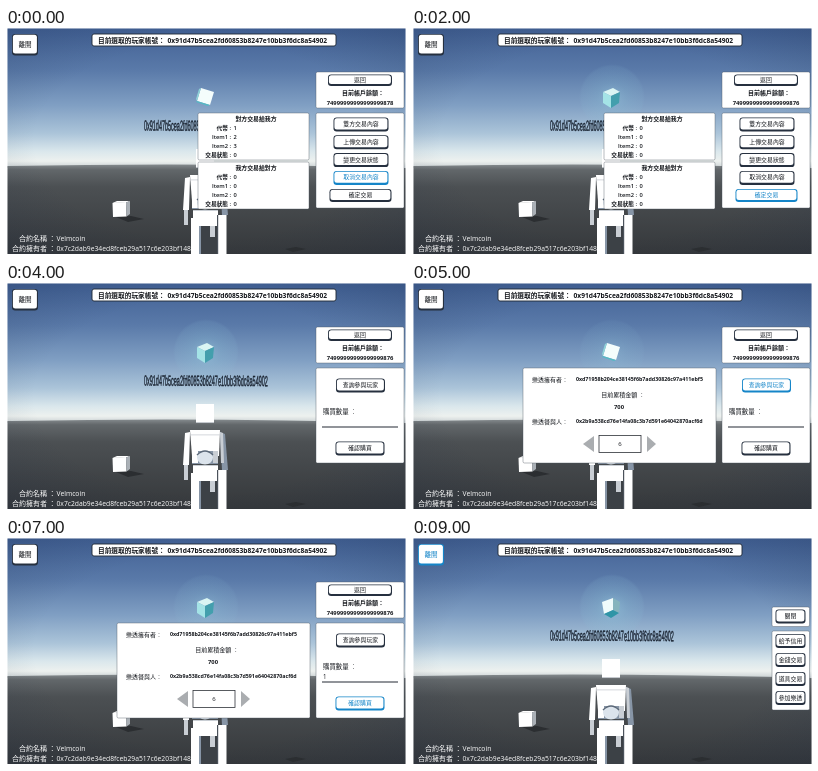
An HTML page that plays this animation: 400x227 px, repeating every 10 s.

```html
<!DOCTYPE html>
<html lang="zh-Hant">
<head>
<meta charset="utf-8">
<style>
html, body { margin: 0; width: 100%; height: 100%; overflow: hidden; background: #fff; }
svg { display: block; width: 100vw; height: 100vh; }
text { font-family: "Open Sans", "Noto Sans CJK TC", "Noto Sans CJK JP", "Noto Sans CJK", sans-serif; white-space: pre; }
.tag { font-family: "Liberation Sans", sans-serif; }
</style>
</head>
<body>
<svg viewBox="0 0 400 227" preserveAspectRatio="none">
  <defs>
    <linearGradient id="sky" x2="0" y2="1">
      <stop offset="0" stop-color="#416094"/>
      <stop offset=".3" stop-color="#5a7aa9"/>
      <stop offset=".55" stop-color="#809fc3"/>
      <stop offset=".75" stop-color="#abc4d9"/>
      <stop offset=".88" stop-color="#dae7ec"/>
      <stop offset=".95" stop-color="#edf1ef"/>
      <stop offset="1" stop-color="#c9d0d2"/>
    </linearGradient>
    <linearGradient id="ground" x2="0" y2="1">
      <stop offset="0" stop-color="#858b8e"/>
      <stop offset=".06" stop-color="#62676a"/>
      <stop offset=".25" stop-color="#4c5053"/>
      <stop offset="1" stop-color="#35383b"/>
    </linearGradient>
    <radialGradient id="halo">
      <stop offset="0" stop-color="#a9e6f0" stop-opacity=".42"/>
      <stop offset=".45" stop-color="#8fcbdd" stop-opacity=".26"/>
      <stop offset=".92" stop-color="#8bbdd6" stop-opacity=".15"/>
      <stop offset="1" stop-color="#8bbdd6" stop-opacity="0"/>
    </radialGradient>
    <radialGradient id="vignette" cx=".5" cy=".5" r=".72">
      <stop offset=".6" stop-color="#14233f" stop-opacity="0"/>
      <stop offset="1" stop-color="#14233f" stop-opacity=".18"/>
    </radialGradient>
  </defs>
  <g id="backdrop"></g>
  <g id="live"></g>
</svg>
<script>
const PLAYER = "0x91d47b5cea2fd60853b8247e10bb3f6dc8a54902";
const OWNER = "0x7c2dab9e34ed8fceb29a517c6e203bf14870dea8";
const LOTTERY = "0xd71958b204ce38145f6b7add30826c97a411ebf5";
const ENTRANT = "0x2b9a538cd76e14fa08c3b7d591e64042870acf6d";
const INK = "#14171c", BLUE = "#1585c8";

const rect = (x, y, w, h, fill, extra = "") =>
  `<rect x="${x}" y="${y}" width="${w}" height="${h}" fill="${fill}" ${extra}/>`;
const poly = (points, fill) => `<polygon points="${points}" fill="${fill}"/>`;
const label = (s, x, y, { size = 6, anchor = "start", fill = INK, weight = 500 } = {}) =>
  `<text x="${x}" y="${y}" font-size="${size}" text-anchor="${anchor}" fill="${fill}" font-weight="${weight}">${s}</text>`;
const centered = (s, x, y, options) => label(s, x, y, { anchor: "middle", ...options });
const panel = (x, y, w, h) => rect(x, y, w, h, "#fff", 'rx="1.5" stroke="#4a525c" stroke-width=".4"');

const looks = {
  plain: { fill: "#fff", edge: "#26303f", ink: INK },
  outline: { fill: "#fff", edge: BLUE, ink: BLUE },
  cyan: { fill: "#8edfeb", edge: "#1d3a47", ink: "#0f3b49" }
};

// A rounded key with a thicker lower edge.
function button(s, x, y, w, h, look = "plain", size = 5.9) {
  const { fill, edge, ink } = looks[look];
  return rect(x, y, w, h, edge, 'rx="3.2"') +
    rect(x + .9, y + .8, w - 2, h - 2.9, fill, 'rx="2.5"') +
    centered(s, x + w / 2, y + h / 2 + size * .36 - .6, { size, fill: ink });
}

function robot() {
  const white = "#fff", shade = "#c9ced4", blue = "#8795a6", dark = "#4b525b";
  return rect(193, 198, 19, 28, "#3c4146") +
    poly("179,150 184,149 183,182 177,182", white) + rect(178, 182, 4, 15, shade) +
    poly("214,149 219,151 222,187 216,187", blue) + poly("214,149 217,150 218,180 215,180", shade) +
    poly("184,147 214,147 213,173 186,173", white) + rect(184, 151.5, 30, .8, shade) +
    rect(186, 168, 26, 13, blue) + rect(186, 168, 6, 12, white) + rect(207, 168, 5, 12, shade) +
    '<ellipse cx="199" cy="174.5" rx="8" ry="7" fill="#dce4ec"/>' +
    '<path d="M191 172Q199 164 207 172" fill="none" stroke="#5b6878" stroke-width="1.4"/>' +
    rect(187, 182, 25, 16, white) + rect(187, 182, 25, 1, shade) +
    rect(185, 190, 8, 36, white) + rect(193, 198, 2, 28, blue) +
    rect(204, 198, 5, 11, shade) + rect(212, 187, 8.5, 39, white) + rect(211, 187, 1.2, 39, dark) +
    rect(190, 121, 18, 18.5, white) + rect(190, 139, 18, .8, shade);
}

function backdrop() {
  const light = { size: 6.75, fill: "#fff", weight: 400 };
  return rect(0, 0, 400, 227, "#fff") +
    rect(1.5, .5, 398, 139.5, "url(#sky)") +
    '<path d="M1.5 138Q200 134 399.5 140V226H1.5Z" fill="url(#ground)"/>' +
    rect(1.5, .5, 398, 225.5, "url(#vignette)") +
    poly("110,189 125,188 138,191 122,194", "#2b2e31") +
    poly("279,221 290,219 300,221 287,224", "#2b2e31") +
    poly("106.5,175 120,174 120.5,188.5 107,189", "#fff") +
    poly("106.5,175 111,173 124,173 120,174.5", "#fff") +
    poly("120,174.5 124,173 124,186 120.5,188.5", "#aab0b6") +
    label("合約名稱 ：", 13, 213, { ...light, size: 7 }) + label("Velmcoin", 50.5, 213, light) +
    label("合約擁有者 ：", 6, 223, { ...light, size: 7 }) + label(OWNER, 50.5, 223, light) +
    robot() +
    rect(86, 6, 244, 12, "#fff", 'rx="2" stroke="#1e2633" stroke-width=".9"') +
    label("目前選取的玩家帳號：", 92, 14.5, { size: 6.7, weight: 600 }) +
    label(PLAYER, 161.5, 14.5, { size: 6.65, weight: 700 });
}

const cubes = {
  tilt: poly("195,60 208,64 204,77 191,73", "#f4fdfc") + poly("195,60 191,73 190,71 193,61", "#8fd3d8") +
    poly("191,73 204,77 202,78 190,74", "#54b9c4"),
  hex: poly("191,64 201,60 208,64 199,68", "#daf5f3") + poly("191,64 199,68 199,80 191,75", "#a4e3e6") +
    poly("199,68 208,64 207,75 199,80", "#439fad"),
  corner: poly("190,64 201,60 201,72 192,76", "#f0fbfb") + poly("201,60 208,64 207,75 201,72", "#86b4bd") +
    poly("192,76 201,72 207,75 199,80", "#2f95a6"),
  diamond: poly("200,60 209,69 200,78 191,69", "#a5f1f3"),
  square: poly("192,63 207,62 208,76 193,78", "#a5e8e1") + poly("192,63 194,61 209,61 207,63", "#dcfaf4") +
    poly("207,63 209,61 209,74 208,76", "#57a7ad")
};

const balanceBox = balance => panel(310, 44, 88, 36) + button("返回", 322, 46.5, 64, 11.5) +
  centered("目前帳戶餘額：", 357, 67.3, { size: 6, weight: 700 }) +
  centered(balance, 354, 76.7, { size: 5.85, weight: 700 });

function tradeTable(title, y, values) {
  const names = ["代幣", "Item1", "Item2", "交易狀態"];
  const bold = { size: 5.7, weight: 600 };
  return panel(192, y, 111, 47) + centered(title, 250, y + 8, { size: 5.9, weight: 600 }) +
    names.map((name, i) => {
      const row = y + 17 + i * 9;
      return label(name + " :", 225, row, { ...bold, anchor: "end" }) + label(values[i], 227.5, row, bold);
    }).join("");
}

function trade({ values = [0, 0, 0, 0], balance, active }) {
  const actions = ["雙方交易內容", "上傳交易內容", "變更交易狀態", "取消交易內容"];
  const look = i => i === active ? "outline" : "plain";
  return tradeTable("對方交易給我方", 85, values) + tradeTable("我方交易給對方", 134, [0, 0, 0, 0]) +
    balanceBox(balance) + panel(310, 85, 88, 95) +
    actions.map((s, i) => button(s, 327.5, 89.5 + i * 17.8, 55, 14, look(i))).join("") +
    button("確定交易", 323.5, 161, 62, 13, look(4));
}

function menu({ active }) {
  const actions = ["給予信用", "金錢交易", "道具交易", "參加樂透"];
  return panel(360, 69, 37.5, 19.5) + button("關閉", 363.5, 71.5, 30, 14) + panel(360, 93, 37.5, 79) +
    actions.map((s, i) => button(s, 363.5, 96 + i * 19, 30, 14,
      i === active ? "cyan" : "plain")).join("");
}

function lottery({ balance, total, page, quantity = "", active }) {
  const bold = { size: 5.3, weight: 700 };
  const dialog = total ? panel(111, 85, 193, 95) +
    label("樂透擁有者：", 120, 98.5) + label(LOTTERY, 164, 98.2, bold) +
    centered("目前累積金額 ：", 211, 114) + centered(total, 207, 126, { size: 5.8, weight: 700 }) +
    label("樂透餐與人：", 120, 140.5) + label(ENTRANT, 164, 140.3, bold) +
    rect(187, 152.5, 42, 17, "#fff", 'stroke="#30343a" stroke-width=".8"') +
    centered(page, 208, 163.2) +
    poly("182,153 182,169 171,161", "#aaadb0") + poly("235,153 235,169 244,161", "#aaadb0") : "";
  return dialog + balanceBox(balance) + panel(310, 85, 88, 95) +
    button("查詢參與玩家", 330, 95.5, 49, 14, active === "query" ? "outline" : "plain") +
    label("購買數量 ：", 317, 131, { size: 6.4 }) + label(quantity, 317, 140.7, { size: 6.2 }) +
    rect(316, 143.5, 76, 1, "#252b34") +
    button("確認購買", 329.5, 158.5, 49, 14, active === "buy" ? "outline" : "plain");
}

const balanceOf = tail => "7" + "4" + "9".repeat(14) + tail;
const before = balanceOf("9878"), traded = balanceOf("9876"), bought = balanceOf("9776");
const offer = [1, 2, 3, 0];

// One scene per second.
const scenes = [
  { view: trade, cube: "tilt", glow: 0, values: offer, balance: before, active: 3 },
  { view: trade, cube: "square", glow: .5, values: offer, balance: before, active: 4 },
  { view: trade, cube: "hex", glow: .75, balance: traded, active: 4 },
  { view: menu, cube: "diamond", glow: 1, active: 3 },
  { view: lottery, cube: "hex", glow: .8, balance: traded },
  { view: lottery, cube: "tilt", glow: .5, balance: traded, total: 700, page: 6, active: "query" },
  { view: lottery, cube: "square", glow: .4, balance: traded, total: 700, page: 6 },
  { view: lottery, cube: "hex", glow: .6, balance: traded, total: 700, page: 6, quantity: 1, active: "buy" },
  { view: lottery, cube: "diamond", glow: .55, balance: bought, total: 800, page: 7, quantity: 1 },
  { view: menu, cube: "corner", glow: .9, leaving: true }
];

function render(scene) {
  return `<circle cx="200" cy="69" r="33" fill="url(#halo)" opacity="${scene.glow}"/>` +
    cubes[scene.cube] +
    `<text class="tag" transform="translate(138 102.5) rotate(.3) scale(.375 1)" font-size="14.6" fill="#1b2533" stroke="#1b2533" stroke-width=".5">${PLAYER}</text>` +
    scene.view(scene) +
    button("離開", 6, 6, 26, 21.5, scene.leaving ? "outline" : "plain", 6.6);
}

document.getElementById("backdrop").innerHTML = backdrop();
const live = document.getElementById("live");
const start = performance.now();
let shown = -1;

function tick() {
  const index = Math.floor(((performance.now() - start) % 10000) / 1000);
  if (index !== shown) {
    shown = index;
    live.innerHTML = render(scenes[index]);
  }
  requestAnimationFrame(tick);
}
tick();
</script>
</body>
</html>
```
